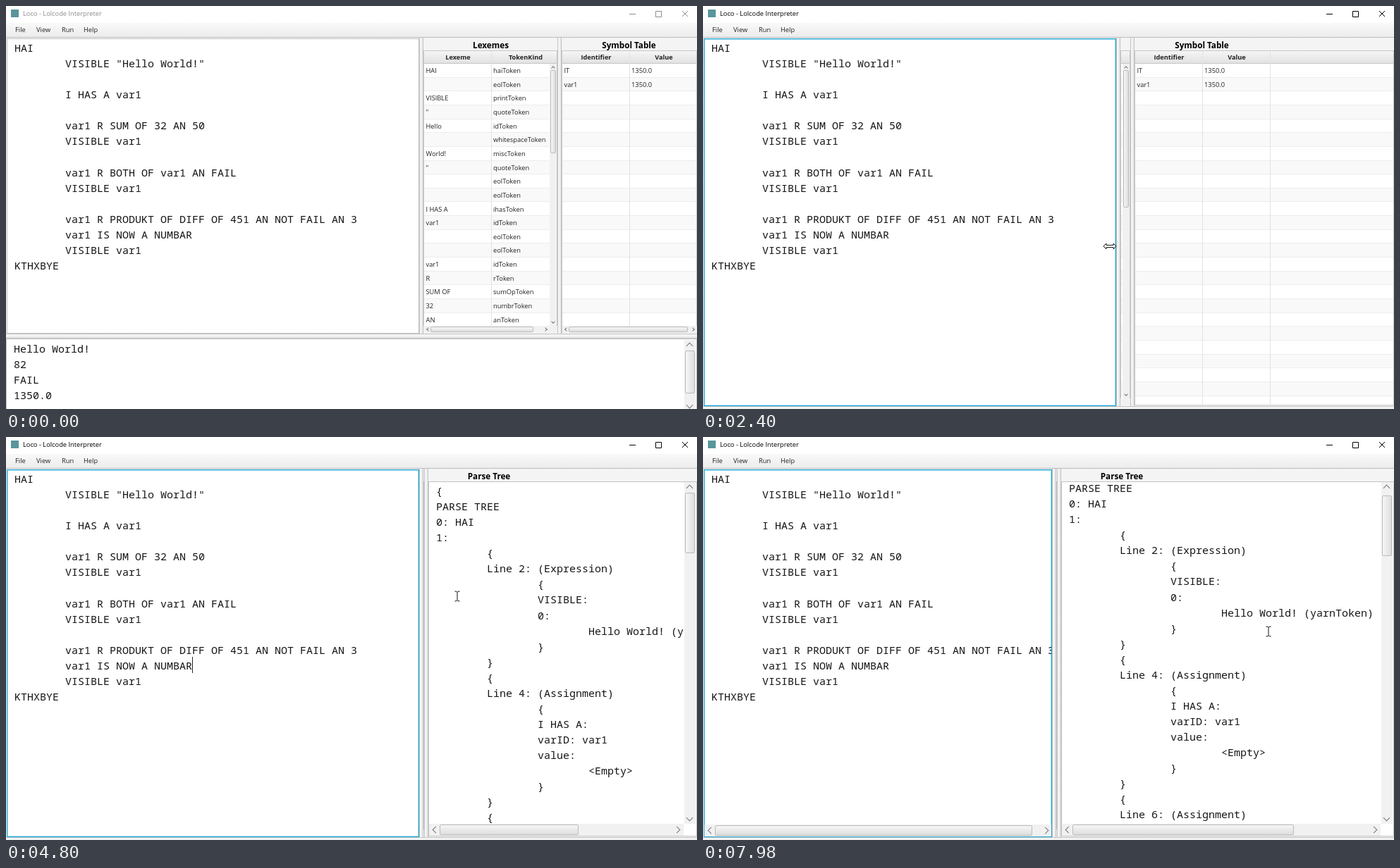
Write an HTML page that moves like this. It is 980x572 px and loops after 8 s.

```html
<!DOCTYPE html>
<html lang="en">
<head>
<meta charset="utf-8">
<title>Loco - Lolcode Interpreter</title>
<style>
html, body { margin: 0; width: 100%; height: 100%; overflow: hidden; }
#stage {
  position: relative; width: 980px; height: 572px; overflow: hidden; cursor: default;
  background: #f4f4f4; color: #222; font: 9.3px "Open Sans", sans-serif; white-space: nowrap;
}
#stage div, #stage svg, .menubar span { position: absolute; box-sizing: border-box; }
.titlebar { left: 0; top: 0; width: 980px; height: 24px; background: #fff; color: #8c8c8c; line-height: 22px; }
.on .titlebar { color: #000; }
.titlebar span { position: absolute; left: 24px; }
.titlebar i { position: absolute; left: 7px; top: 5px; width: 11px; height: 11px; background: #58959c; }
.titlebar path { fill: none; stroke: currentColor; }
.menubar {
  left: 0; top: 24px; width: 980px; height: 21px; line-height: 20px;
  background: linear-gradient(#f9f9f9, #ececec); border-bottom: 1px solid #bdbdbd;
}
.menubar span { top: 0; height: 20px; padding: 0 8px; }
.menubar .open, .popup .hover { background: #0096c9; color: #fff; }
.popup {
  left: 35px; top: 46px; width: 101px; height: 90px; padding: 2px 0;
  background: #f4f4f4; border: 1px solid #c0c0c0; box-shadow: 0 3px 7px #0004;
}
.popup p { margin: 0; padding-left: 9px; line-height: 28px; }

.mono {
  margin: 0; position: absolute; color: #161616; white-space: pre; tab-size: 8;
  font: 500 15px/22.07px "Noto Sans Mono", monospace;
}
.editor {
  left: 1px; top: 46px; width: calc(var(--L) - 1px); height: calc(var(--B) - 46px);
  background: #fff; border: 1px solid #c4c4c4; overflow: hidden;
}
.on .editor { border-color: #1fa6d2; box-shadow: inset 0 0 0 1px #a5dcee; }
.editor .mono { left: 10px; top: 1px; width: calc(var(--L) - 13px); }
#caret { position: absolute; margin-top: -1px; height: 23px; border-left: 1.4px solid #222; }

.pane { top: 45px; height: calc(var(--B) - 46px); overflow: hidden; }
.lex { left: calc(var(--L) + 6px); width: calc(var(--R) - var(--L) - 6px); }
.side { left: calc(var(--R) + 6px); right: 0; }
.name { top: 1px; width: 191px; text-align: center; font-weight: bold; font-size: 11.7px; line-height: 18px; color: #000; }
.tree .name { width: 172px; }
.fill { inset: 0; }
.table { inset: 18px 0 0; border: 1px solid #c8c8c8; background: #fff; overflow: hidden; }
.head {
  left: 0; right: 0; top: 0; height: 18px; line-height: 18px; font-weight: bold; font-size: 9.2px;
  background: linear-gradient(#f5f5f5, #e2e2e2); border-bottom: 1px solid #c8c8c8;
}
.head div { width: 96px; text-align: center; }
.rows {
  inset: 18px 0 0; line-height: 19.65px; overflow: hidden;
  background: repeating-linear-gradient(#fff 0 18.65px, #ededed 18.65px 19.65px, #f9f9f9 19.65px 38.3px, #ededed 38.3px 39.3px);
}
.col { top: 0; bottom: 0; width: 1px; background: #e2e2e2; }
.foot { left: 0; right: 0; bottom: 0; height: 10px; background: #f1f1f1; }
.text { inset: 18px 0 0; border: 1px solid #c4c4c4; background: #fff; }
.view { inset: 0 18px 17px 0; overflow: hidden; }
.view .mono { left: 10px; }

.div { background: linear-gradient(90deg, #f8f8f8, #e9e9e9); border: solid #c2c2c2; border-width: 0 1px; width: 6px; top: 45px; height: calc(var(--B) - 45px); }
.split { left: 0; top: var(--B); width: 980px; height: 7px; background: linear-gradient(#f8f8f8, #e9e9e9); border: solid #c2c2c2; border-width: 1px 0; }
.console { left: 0; top: calc(var(--B) + 7px); width: 980px; height: 103px; background: #fff; border: 1px solid #c4c4c4; }
.console .mono { left: 10px; top: 2px; }

.bar { background: #f1f1f1; }
.bar[hidden] { display: none; }
.bar b { position: absolute; box-sizing: border-box; border: 1px solid #bbb; border-radius: 2px; }
.v { width: 10px; } .h { height: 10px; }
.v.big { width: 16px; } .h.big { height: 17px; }
.v b { left: 1px; right: 1px; background: linear-gradient(90deg, #f6f6f6, #dedede); }
.h b { top: 1px; bottom: 1px; background: linear-gradient(#f6f6f6, #dedede); }
.bar::before, .bar::after {
  content: ""; position: absolute; width: 3px; height: 3px;
  border: solid #777; border-width: 1px 0 0 1px;
}
.big::before, .big::after { width: 6px; height: 6px; border-width: 1.4px 0 0 1.4px; }
.v::before, .v::after { left: calc(50% - 2px); }
.h::before, .h::after { top: calc(50% - 2px); }
.big.v::before, .big.v::after { left: calc(50% - 3.7px); }
.big.h::before, .big.h::after { top: calc(50% - 3.7px); }
.v::before { top: 4px; transform: rotate(45deg); }
.v::after { bottom: 4px; transform: rotate(225deg); }
.h::before { left: 4px; transform: rotate(-45deg); }
.h::after { right: 4px; transform: rotate(135deg); }
.big.v::before { top: 5px; } .big.v::after { bottom: 5px; }
.big.h::before { left: 6px; } .big.h::after { right: 6px; }

#lexV { right: 1px; top: 37px; } #lexH { left: 1px; bottom: 0; }
#symH { left: 1px; bottom: 0; }
#treeV { right: 2px; top: 19px; } #treeH { left: 1px; bottom: 1px; }
#edH { left: 0; bottom: 0; }
#conV { right: 1px; top: 1px; }
#pointer { left: 0; top: 0; width: 1px; height: 1px; overflow: visible; stroke: #111; stroke-linejoin: round; }
</style>
</head>
<body>
<div id="stage">
  <div class="titlebar"><i></i><span>Loco - Lolcode Interpreter</span>
    <svg width="980" height="24"><path d="M884 11.5h9M921.5 7.5h8v8h-8zM959 7l8 8M967 7l-8 8"/></svg>
  </div>
  <div class="menubar">
    <span style="left:5px">File</span><span style="left:35px" id="viewMenu">View</span>
    <span style="left:71px">Run</span><span style="left:102px">Help</span>
  </div>

  <div class="editor"><pre class="mono" id="code">HAI
	VISIBLE "Hello World!"

	I HAS A var1

	var1 R SUM OF 32 AN 50
	VISIBLE var1

	var1 R BOTH OF var1 AN FAIL
	VISIBLE var1

	var1 R PRODUKT OF DIFF OF 451 AN NOT FAIL AN 3
	var1 IS NOW A NUMBAR<i id="caret"></i>
	VISIBLE var1
KTHXBYE</pre><div class="bar h big" id="edH"><b></b></div></div>

  <div class="pane lex">
    <div class="name">Lexemes</div>
    <div class="table" id="lexTable"></div>
    <div class="foot"></div>
    <div class="bar v" id="lexV"><b></b></div><div class="bar h" id="lexH"><b></b></div>
  </div>

  <div class="pane side">
    <div class="fill" id="symbols">
      <div class="name">Symbol Table</div>
      <div class="table" id="symTable"></div>
      <div class="bar h" id="symH"><b></b></div>
    </div>
    <div class="fill tree" id="tree">
      <div class="name">Parse Tree</div>
      <div class="text"><div class="view"><pre class="mono" id="treeText">{
PARSE TREE
0: HAI
1:
	{
	Line 2: (Expression)
		{
		VISIBLE:
		0:
			Hello World! (yarnToken)
		}
	}
	{
	Line 4: (Assignment)
		{
		I HAS A:
		varID: var1
		value:
			&lt;Empty&gt;
		}
	}
	{
	Line 6: (Assignment)
		{</pre></div></div>
      <div class="bar v big" id="treeV"><b></b></div><div class="bar h big" id="treeH"><b></b></div>
    </div>
  </div>

  <div class="div" style="left:var(--L)"></div>
  <div class="div" style="left:var(--R)"></div>
  <div class="split"></div>
  <div class="console"><pre class="mono">Hello World!
82
FAIL
1350.0</pre><div class="bar v big" id="conV"><b></b></div></div>

  <div class="popup" id="popup"><p>Lexemes</p><p>Symbol Table</p><p>Parse Tree</p></div>
  <svg id="pointer"><path/></svg>
</div>

<script>
const LOOP = 8000, STEP = 60;
const $ = id => document.getElementById(id);
const stage = $('stage'), pointer = $('pointer'), shape = pointer.firstChild;

// Tables
function fillTable(id, heads, rows) {
  const cell = (x, y, s) => `<div style="left:${x}px;top:${y}px">${s}</div>`;
  $(id).innerHTML =
    `<div class="head">${heads.map((h, i) => cell(i * 96, 0, h)).join('')}</div>` +
    `<div class="rows">${rows.map((r, i) => r.map((s, j) => cell(2.5 + j * 95.5, i * 19.65, s)).join('')).join('')}</div>` +
    '<div class="col" style="left:95px"></div><div class="col" style="left:191px"></div>';
}
const lexemes = `HAI:hai :eol VISIBLE:print ":quote Hello:id :whitespace World!:misc ":quote :eol :eol
  I_HAS_A:ihas var1:id :eol :eol var1:id R:r SUM_OF:sumOp 32:numbr AN:an 50:numbr :eol VISIBLE:print var1:id :eol`;
fillTable('lexTable', ['Lexeme', 'TokenKind'], lexemes.split(/\s+/).map(s => {
  const [word, kind] = s.split(':');
  return [word.replace(/_/g, ' '), kind + 'Token'];
}));
fillTable('symTable', ['Identifier', 'Value'], [['IT', '1350.0'], ['var1', '1350.0']]);

// Tracks: [ms, value...]
const bottomTrack = [[840, 465], [900, 492], [960, 509], [1020, 541], [1080, 568]];
const leftTrack = [[5640, 586], [5940, 495]];
const rightTrack = [[2220, 782], [2400, 606], [2460, 593], [6540, 593], [6840, 502]];
const pointerTrack = [
  [60, 743, 222], [300, 560, 372], [420, 395, 486], [540, 383, 469], [840, 383, 470],
  [900, 393, 497], [960, 398, 514], [1020, 406, 546], [1080, 412, 600], [1260, 412, 600],
  [1320, 645, 451], [1560, 735, 400], [2040, 785, 341], [2220, 785, 341], [2400, 577, 341],
  [2520, 570, 341], [3000, 82, 60], [3180, 63, 44], [3360, 52, 32], [3540, 52, 32],
  [3720, 58, 60], [4080, 98, 121], [4320, 98, 121], [4680, 600, 222], [4800, 640, 226],
  [5160, 605, 231], [5400, 588, 231], [5640, 588, 231], [5940, 497, 234], [6000, 497, 236],
  [6120, 577, 238], [6360, 596, 238], [6540, 596, 238], [6840, 480, 236], [6900, 480, 236],
  [7320, 800, 276], [7500, 802, 276]
];
function at(track, t) {
  const i = track.findIndex(k => k[0] > t);
  if (i === 0) return track[0].slice(1);
  if (i < 0) return track[track.length - 1].slice(1);
  const a = track[i - 1], b = track[i], f = (t - a[0]) / (b[0] - a[0]);
  return a.slice(1).map((v, j) => v + (b[j + 1] - v) * f);
}

const resize = 'M-9 0L-5-4V-1.5H5V-4L9 0 5 4V1.5H-5V4Z';
const shapes = {
  arrow: 'M0 0V13.5L3.2 10.6 5.3 15.6 7.6 14.6 5.5 9.8H9.6Z',
  beam: 'M-3.5-7Q0-7 0-5.5V5.5Q0 7-3.5 7M3.5-7Q0-7 0-5.5M0 5.5Q0 7 3.5 7',
  across: resize, down: resize
};
const within = (t, a, b) => t >= a && t < b;

function pointerKind(t, x, y, L, R, B) {
  if (y < 46 || within(t, 3300, 4260)) return 'arrow';
  if (Math.abs(y - B - 4) < 6) return 'down';
  if (y > B + 8) return 'beam';
  if (within(t, 2220, 2520) || within(t, 6540, 6960)) return 'across';
  if (Math.abs(x - L - 3) < 6 || Math.abs(x - R - 3) < 6) return 'across';
  if (x < L || (t >= 4260 && x > R + 6 && x < 962 && y > 64)) return 'beam';
  return 'arrow';
}

function bar(id, view, total, pos = 0) {
  const el = $(id), vertical = el.classList.contains('v');
  const end = el.classList.contains('big') ? 14.5 : 9, track = view - 2 * end;
  el.hidden = view >= total || track < 8;
  const size = vertical ? 'height' : 'width', side = vertical ? 'top' : 'left', thumb = el.firstChild;
  el.style[size] = view + 'px';
  thumb.style[size] = track * view / total + 'px';
  thumb.style[side] = end + track * pos / total + 'px';
}

function render(t) {
  const [L] = at(leftTrack, t), [R] = at(rightTrack, t), [B] = at(bottomTrack, t);
  const [x, y] = at(pointerTrack, t);
  for (const [k, v] of Object.entries({ L, R, B })) stage.style.setProperty('--' + k, v + 'px');
  stage.classList.toggle('on', t >= 840);

  // Editor: long lines wrap until the scroll bar comes in
  const scrolls = t >= 6000;
  $('code').style.whiteSpace = scrolls ? 'pre' : 'pre-wrap';
  $('caret').hidden = t < 1884 || Math.floor((t - 1884) / 468) % 2 === 1;
  bar('edH', L - 2, scrolls ? 508 : 0);

  // Side panes
  const showTree = t >= 4260, scroll = t >= 7980 ? 26 : 0;
  $('symbols').hidden = showTree;
  $('tree').hidden = !showTree;
  $('treeText').style.top = 1 - scroll + 'px';
  bar('lexV', B - 93, 1115);
  bar('lexH', R - L - 18, 195);
  bar('symH', 980 - R - 7, 195);
  bar('treeV', B - 83, 2565, scroll);
  bar('treeH', 954 - R, 607);
  bar('conV', 101, 118);

  // View menu
  $('viewMenu').className = within(t, 3240, 4260) ? 'open' : '';
  $('popup').hidden = !within(t, 3300, 4260);
  [...$('popup').children].forEach((p, i) => {
    p.className = i === Math.floor((y - 49) / 28) ? 'hover' : '';
  });

  const kind = pointerKind(t, x, y, L, R, B);
  pointer.style.display = t < 60 ? 'none' : '';
  shape.setAttribute('d', shapes[kind]);
  shape.setAttribute('fill', kind === 'beam' ? 'none' : '#fff');
  shape.setAttribute('transform', `translate(${x} ${y})` + (kind === 'down' ? ' rotate(90)' : ''));
}

const start = performance.now();
function tick() {
  const t = (performance.now() - start) % LOOP;
  render(Math.floor(t / STEP) * STEP);
  requestAnimationFrame(tick);
}
tick();
</script>
</body>
</html>
```
